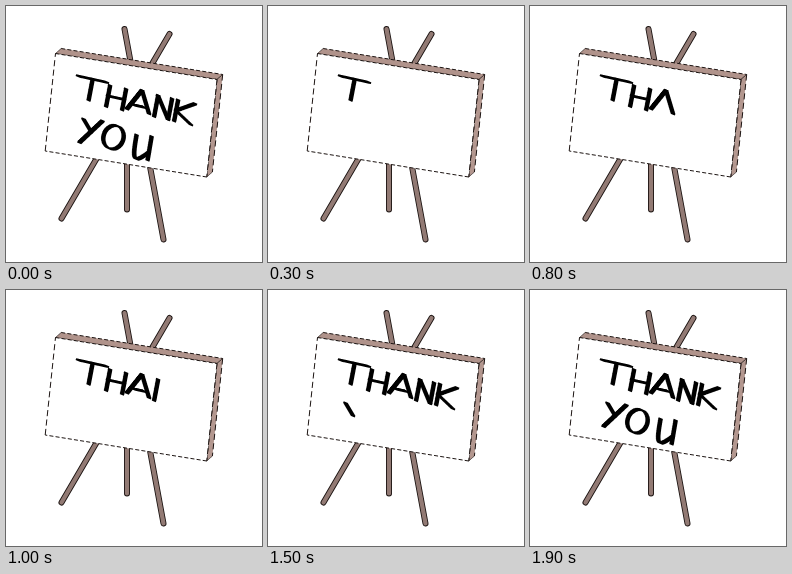
These frames come from a looping animation (256 by 256 pixels, 2800 ms). An HTML page with a canvas:

```html
<!DOCTYPE html>
<html lang="en">
<head>
<meta charset="utf-8">
<title>Thank you sign</title>
<style>
html, body { margin: 0; width: 100%; height: 100%; overflow: hidden; background: #fff; }
canvas { display: block; width: 256px; height: 256px; }
</style>
</head>
<body>
<canvas id="stage" width="256" height="256"></canvas>
<script>
const ctx = document.getElementById('stage').getContext('2d');
const LOOP = 2800, STEP = 100;
const TOP = '#b0938b', SIDE = '#b3978f', LEG = '#927a74', EDGE = '#1c1412', INK = '#000';

function line([x1, y1], [x2, y2], color, width) {
  ctx.strokeStyle = color;
  ctx.lineWidth = width;
  ctx.beginPath();
  ctx.moveTo(x1, y1);
  ctx.lineTo(x2, y2);
  ctx.stroke();
}

function leg(from, to) {
  ctx.lineCap = 'round';
  line(from, to, EDGE, 6);
  line(from, to, LEG, 4.2);
  ctx.lineCap = 'butt';
}

// Broken outline: one dash for each pixel step of the slanted edge.
function edge(a, b) {
  const dx = Math.abs(b[0] - a[0]), dy = Math.abs(b[1] - a[1]);
  const period = Math.max(dx, dy) / Math.min(dx, dy);
  ctx.setLineDash([period * 0.65, period * 0.35]);
  line(a, b, EDGE, 1);
  ctx.setLineDash([]);
}

function face(corners, fill) {
  ctx.fillStyle = fill;
  ctx.beginPath();
  for (const p of corners) ctx.lineTo(...p);
  ctx.fill();
  corners.forEach((p, i) => edge(p, corners[(i + 1) % corners.length]));
}

// Board corner: u across, v down, d towards the back.
const corner = (u, v, d = 0) => [49.5 + 161.5 * u - 10.3 * v + 5.7 * d, 47.5 + 26 * u + 97.5 * v - 5 * d];

function easel() {
  leg([121, 150], [121, 203.5]);
  leg([163.5, 28], [55.5, 212.5]);
  leg([118.5, 23], [157.5, 233.5]);
  face([corner(0, 0), corner(0, 0, 1), corner(1, 0, 1), corner(1, 0)], TOP);
  face([corner(1, 0), corner(1, 0, 1), corner(1, 1, 1), corner(1, 1)], SIDE);
  face([corner(0, 0), corner(1, 0), corner(1, 1), corner(0, 1)], '#fff');
}

// Pen path through grid points, each written as two digits from 0 to 4.
function path(digits) {
  const points = digits.match(/../g).map(([x, y]) => [x / 4, y / 4]);
  return t => {
    const pos = t * (points.length - 1);
    const i = Math.min(Math.floor(pos), points.length - 2);
    return points[i].map((a, k) => a + (points[i + 1][k] - a) * (pos - i));
  };
}

const ring = t => [0.5 + 0.5 * Math.cos(2 * Math.PI * t), 0.5 + 0.5 * Math.sin(2 * Math.PI * t)];
const hook = t => [t ** 3, Math.sin(2.4 * t)];

const GLYPHS = {
  T: [path('0040'), path('2024')],
  H: [path('0004'), path('0242'), path('4044')],
  A: [path('2004'), path('2044'), path('1333')],
  N: [path('0004'), path('0044'), path('4044')],
  K: [path('0004'), path('400244')],
  Y: [path('0022'), path('4004')],
  O: [ring],
  U: [hook, path('4044')]
};

// Letters stand in leaning boxes: corner x, y and width.
const ROWS = [
  { slope: 0.22, height: 21, letters: { T: [72, 70, 29], H: [104, 79.5, 16], A: [125, 82, 22], N: [152, 89.5, 14], K: [172, 94, 17] } },
  { slope: 0.1, height: 23.5, letters: { Y: [77.5, 113, 19], O: [99.5, 118.5, 20], U: [130.5, 129, 15] } }
];

const strokes = ROWS.flatMap(({ slope, height, letters }) =>
  Object.entries(letters).flatMap(([name, [x, y, w]]) =>
    GLYPHS[name].map(pen => t => {
      const [u, v] = pen(t);
      return [x + u * w - 4 * v, y + u * w * slope + v * height];
    })));

// Sweep a flat, slightly tilted nib along the path.
function ink(pen) {
  ctx.strokeStyle = INK;
  ctx.lineWidth = 1.8;
  ctx.beginPath();
  for (let i = 0; i <= 80; i++) {
    const [x, y] = pen(i / 80);
    ctx.moveTo(x - 2.1, y - 0.9);
    ctx.lineTo(x + 2.1, y + 0.9);
  }
  ctx.stroke();
}

function draw(now) {
  const step = Math.min(19, Math.floor((now % LOOP) / STEP));
  const count = step === 0 ? strokes.length : step - 1;
  ctx.fillStyle = '#fff';
  ctx.fillRect(0, 0, 256, 256);
  easel();
  strokes.slice(0, count).forEach(ink);
}

let start;
function tick(now) {
  start ??= now;
  draw(now - start);
  requestAnimationFrame(tick);
}
draw(0);
requestAnimationFrame(tick);
</script>
</body>
</html>
```
